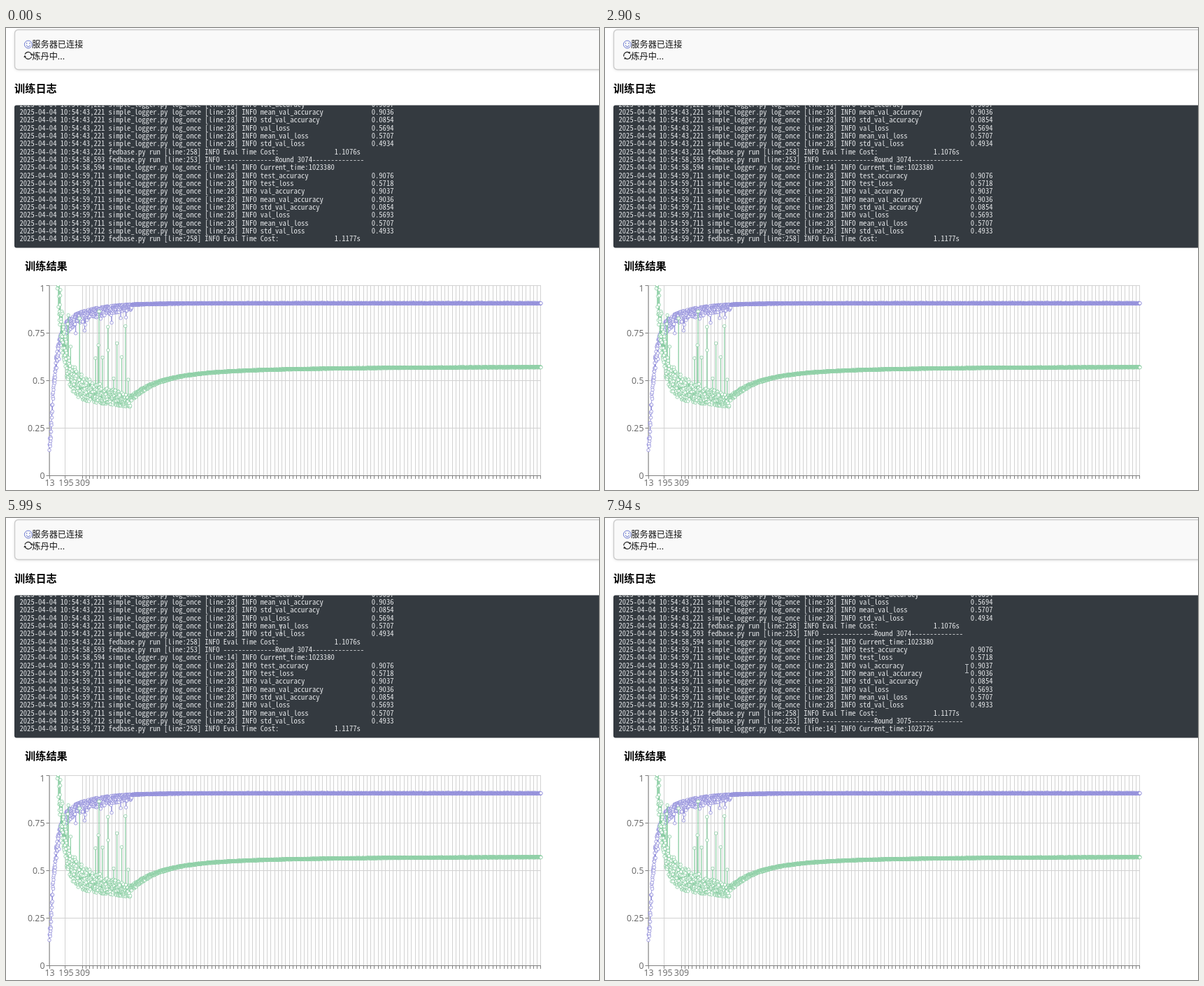
These frames come from a looping animation (848x661 px, 8 s). An HTML page with a canvas:

```html
<!DOCTYPE html>
<html lang="zh">
<head>
<meta charset="utf-8">
<style>
  html, body { margin: 0; width: 100%; height: 100%; overflow: hidden; background: #fff; }
  canvas { display: block; }
</style>
</head>
<body>
<canvas id="stage" width="848" height="661"></canvas>
<script>
const LOOP = 8000, W = 848, H = 661;
const SANS = '"Noto Sans CJK SC", "Noto Sans CJK", sans-serif';
const MONO = '"Noto Sans Mono CJK SC", "Liberation Mono", monospace';
const LOG = { left: 12, top: 110.5, bottom: 314.5, lineHeight: 11.34, charWidth: 5.3 };
const PLOT = { left: 62, right: 765, top: 368.5, bottom: 640.5 };
const stage = document.getElementById('stage').getContext('2d');

let seed = 7;
const random = () => (seed = seed * 16807 % 2147483647) / 2147483647;
const clamp01 = v => Math.min(1, Math.max(0, v));
const smooth = f => f * f * (3 - 2 * f);
const decay = (distance, length) => Math.exp(-distance / length);

function text(c, str, x, y, font, color, align = 'left') {
  c.font = font;
  c.fillStyle = color;
  c.textAlign = align;
  c.fillText(str, x, y);
}

function line(c, x1, y1, x2, y2) {
  c.beginPath();
  c.moveTo(x1, y1);
  c.lineTo(x2, y2);
  c.stroke();
}

// ---------- Log ----------
const metric = (time, name, value) =>
  `2025-04-04 10:54:${time} simple_logger.py log_once [line:28] INFO ${name.padEnd(30)}${value}`;
const evalCost = (time, cost) =>
  `2025-04-04 10:54:${time} fedbase.py run [line:258] INFO ${'Eval Time Cost:'.padEnd(30)}${cost}s`;
const dashes = '-'.repeat(14);
const roundStart = (time, n) =>
  `2025-04-04 ${time} fedbase.py run [line:253] INFO ${dashes}Round ${n}${dashes}`;
const currentTime = (time, value) =>
  `2025-04-04 ${time} simple_logger.py log_once [line:14] INFO Current_time:${value}`;

const logLines = [
  metric('43,221', 'val_accuracy', '0.9037'),
  metric('43,221', 'mean_val_accuracy', '0.9036'),
  metric('43,221', 'std_val_accuracy', '0.0854'),
  metric('43,221', 'val_loss', '0.5694'),
  metric('43,221', 'mean_val_loss', '0.5707'),
  metric('43,221', 'std_val_loss', '0.4934'),
  evalCost('43,221', '1.1076'),
  roundStart('10:54:58,593', 3074),
  currentTime('10:54:58,594', 1023380),
  metric('59,711', 'test_accuracy', '0.9076'),
  metric('59,711', 'test_loss', '0.5718'),
  metric('59,711', 'val_accuracy', '0.9037'),
  metric('59,711', 'mean_val_accuracy', '0.9036'),
  metric('59,711', 'std_val_accuracy', '0.0854'),
  metric('59,711', 'val_loss', '0.5693'),
  metric('59,711', 'mean_val_loss', '0.5707'),
  metric('59,712', 'std_val_loss', '0.4933'),
  evalCost('59,712', '1.1177'),
  roundStart('10:55:14,571', 3075),
  currentTime('10:55:14,571', 1023726),
];

stage.font = `100px ${MONO}`;
const logFont = `${100 * LOG.charWidth / stage.measureText('0').width}px ${MONO}`;

function drawLog(t) {
  const c = stage;
  const visible = t < 7180 ? logLines.slice(0, -2) : logLines;
  const scroll = 2 * LOG.lineHeight * smooth(clamp01((t - 7280) / 270));
  c.save();
  c.beginPath();
  c.roundRect(LOG.left, LOG.top, 860, LOG.bottom - LOG.top, 3);
  c.fillStyle = '#343a40';
  c.fill();
  c.clip();
  visible.forEach((entry, i) =>
    text(c, entry, 19.5, 112.5 + i * LOG.lineHeight - scroll, logFont, '#e6e8ea'));
  c.restore();
}

// ---------- Chart ----------
// Accuracy climbs quickly, then slowly; the scatter ends once training settles.
function accuracy(x) {
  const u = Math.max(0, x - 63.5);
  const high = .909 - .14 * decay(u, 40) - .56 * decay(u, 7);
  if (x > 180) return high - .004 * random();
  const dip = random() < .03 ? .07 * random() : 0;
  return high - .075 * random() ** 1.6 * (1 - u / 200) - dip;
}

// Loss falls with random spikes, then creeps up to a plateau.
function loss(x) {
  const settled = x - 178;
  if (settled > 0) {
    const mean = .572 - .12 * decay(settled, 38) - .05 * decay(settled, 160);
    return mean + (random() - .5) * (.003 + .03 * decay(settled, 35));
  }
  const u = x - 73, progress = u / 105;
  const low = .36 + .6 * decay(u, 8.5) + .05 * (1 - progress);
  const spread = .06 + .1 * (1 - progress) + .15 * decay(u, 8.5);
  const spike = random() < .05 ? .42 * random() : 0;
  return low + spread * random() ** 1.3 + spike;
}

function drawSeries(c, valueAt, color) {
  const points = [];
  for (let x = PLOT.left; x <= PLOT.right; x += .24) {
    points.push([x, PLOT.bottom - valueAt(x) * (PLOT.bottom - PLOT.top)]);
  }
  c.strokeStyle = color;
  c.lineWidth = .76;
  c.beginPath();
  points.forEach(([x, y]) => c.lineTo(x, y));
  c.stroke();
  c.fillStyle = '#fff';
  for (const [x, y] of points) {
    c.beginPath();
    c.arc(x, y, 2.25, 0, 7);
    c.fill();
    c.stroke();
  }
}

function drawChart(c) {
  const { left, right, top, bottom } = PLOT;
  const labelFont = '12.4px "Open Sans", "Noto Sans", sans-serif';
  const ticks = [62, 84];
  for (let x = 109; x <= right; x += 5.29) ticks.push(Math.floor(x));
  const levels = [0, .25, .5, .75, 1].map(v => [v, bottom - v * (bottom - top)]);

  c.lineWidth = 1;
  c.strokeStyle = '#d2d2d2';
  for (const x of ticks) line(c, x + .5, top, x + .5, bottom);
  for (const [, y] of levels) line(c, left, y, right, y);
  c.strokeStyle = '#808080';
  line(c, left, top, left, bottom);
  line(c, left, bottom, right, bottom);
  for (const x of ticks) line(c, x + .5, bottom, x + .5, bottom + 4.5);
  for (const [v, y] of levels) {
    line(c, left - 4.5, y, left, y);
    text(c, `${v}`, 55.5, Math.max(377, y + 4.5), labelFont, '#666', 'right');
  }
  ['13', '195', '309'].forEach((label, i) =>
    text(c, label, 62.5 + i * 23.5, 655, labelFont, '#666', 'center'));

  c.save();
  c.beginPath();
  c.rect(left - 4, top - .5, right - left + 8, bottom - top + 4);
  c.clip();
  drawSeries(c, accuracy, '#8884d8');
  drawSeries(c, loss, '#82ca9d');
  c.restore();
}

// ---------- Status panel and headings ----------
function drawPanel(c) {
  c.save();
  c.shadowColor = 'rgba(0,0,0,.12)';
  c.shadowBlur = 4;
  c.shadowOffsetY = 1;
  c.beginPath();
  c.roundRect(12.5, 2.5, 860, 57, 5);
  c.fillStyle = '#f9f9f9';
  c.fill();
  c.restore();
  c.strokeStyle = '#ccc';
  c.lineWidth = 1.4;
  c.stroke();

  c.strokeStyle = c.fillStyle = '#6a78d1';
  c.lineWidth = 1;
  c.beginPath();
  c.arc(31.8, 23.5, 5.4, 0, 7);
  c.stroke();
  c.beginPath();
  c.arc(31.8, 24.1, 2.6, .15, Math.PI - .15);
  c.stroke();
  for (const x of [29.6, 34]) {
    c.beginPath();
    c.arc(x, 21.9, .8, 0, 7);
    c.fill();
  }
  text(c, '服务器已连接', 37.3, 28.2, `12.2px ${SANS}`, '#111');
  text(c, '炼丹中...', 37.3, 44.5, `12.2px ${SANS}`, '#111');
  text(c, '训练日志', 12, 92, `bold 15.2px ${SANS}`, '#000');
  text(c, '训练结果', 27, 346, `bold 15.2px ${SANS}`, '#000');
}

function drawSpinner(t) {
  const c = stage;
  c.save();
  c.translate(31.8, 39.4);
  c.rotate(t / 1000 * 2 * Math.PI);
  c.strokeStyle = c.fillStyle = '#222';
  c.lineWidth = 1.2;
  for (let half = 0; half < 2; half++) {
    c.rotate(Math.PI);
    c.beginPath();
    c.arc(0, 0, 5, .35, Math.PI - .35);
    c.stroke();
    c.beginPath();
    c.moveTo(-6.6, 2.3);
    c.lineTo(-4.8, -.6);
    c.lineTo(-2.9, 2.5);
    c.fill();
  }
  c.restore();
}

// ---------- Pointer ----------
const pointerStops = [
  { t: 3640, x: 832, y: 445 },
  { t: 4090, x: 552, y: 271 },
  { t: 4750, x: 552, y: 271 },
  { t: 5990, x: 393, y: 159 },
  { t: 6350, x: 470, y: 196 },
  { t: 6960, x: 130, y: 76 },
  { t: 7250, x: 186.5, y: 76 },
  { t: 7940, x: 517.5, y: 215.5 },
];
const arrow = new Path2D('M0 0V12L2.8 9.5L4.7 13.6L6.5 12.8L4.7 8.8L8.4 8.6Z');
const textCursor = new Path2D('M-2.5 -6H2.5M0 -6V6M-2.5 6H2.5');

function drawPointer(t) {
  if (t < pointerStops[0].t) return;
  const c = stage;
  const last = pointerStops.length - 1;
  const next = pointerStops.findIndex(stop => stop.t > t);
  const i = next < 0 ? last : next;
  const a = pointerStops[i - 1], b = pointerStops[i];
  const f = clamp01((t - a.t) / (b.t - a.t));
  const x = a.x + (b.x - a.x) * f, y = a.y + (b.y - a.y) * f;

  c.save();
  c.translate(x, y);
  c.lineWidth = .9;
  if (y > LOG.top && y < LOG.bottom) {
    c.strokeStyle = '#c8ccd0';
    c.stroke(textCursor);
  } else {
    c.fillStyle = '#fff';
    c.fill(arrow);
    c.strokeStyle = '#111';
    c.stroke(arrow);
  }
  c.restore();
}

const background = document.createElement('canvas');
background.width = W;
background.height = H;
const still = background.getContext('2d');
still.fillStyle = '#fff';
still.fillRect(0, 0, W, H);
drawPanel(still);
drawChart(still);

function frame() {
  const t = performance.now() % LOOP;
  stage.drawImage(background, 0, 0);
  drawSpinner(t);
  drawLog(t);
  drawPointer(t);
  requestAnimationFrame(frame);
}
frame();
</script>
</body>
</html>
```
